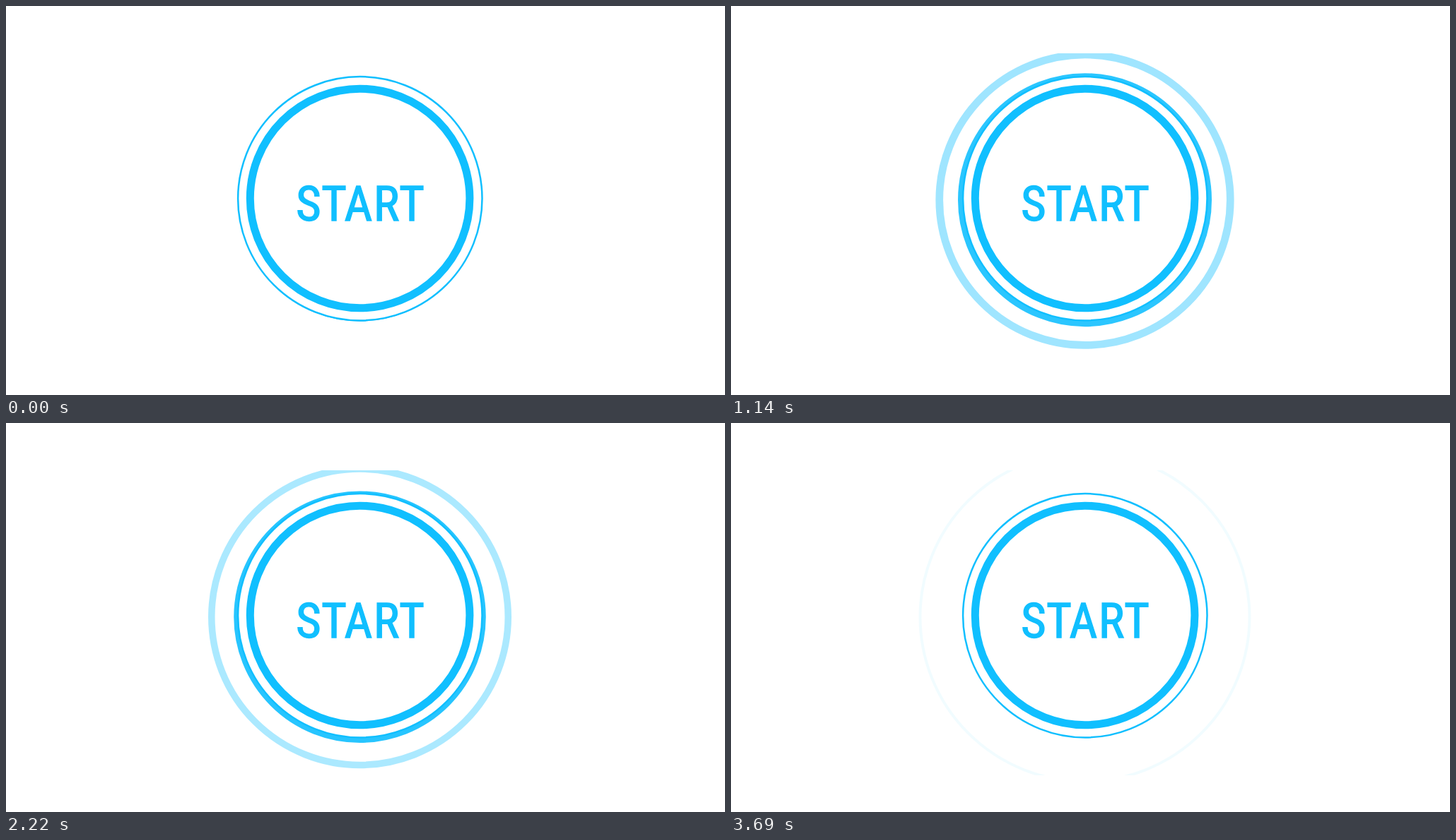
An HTML page for the animation above (4.32 s loop, 1017x551 px).

```html
<!DOCTYPE html>
<html lang="en">
<head>
<meta charset="utf-8">
<title>Start button</title>
<style>
  html, body { margin: 0; width: 100%; height: 100%; overflow: hidden; background: #fff; }
  svg { display: block; width: 100%; height: 100%; }
  text {
    font: 400 69px "Roboto Condensed", "Noto Sans Mono", monospace;
    text-anchor: middle;
    fill: #10bfff;
    stroke: #10bfff;
    stroke-width: 1.3;
  }
</style>
</head>
<body>
<svg viewBox="0 0 1017 551">
  <defs>
    <clipPath id="band"><rect x="0" y="67" width="1017" height="432"/></clipPath>
  </defs>
  <g id="waves" clip-path="url(#band)" fill="none" stroke="#10bfff">
    <circle id="trace" cx="500.5" cy="274.7" r="233" stroke-width="4" stroke-opacity=".055"/>
  </g>
  <g fill="#fff" stroke="#10bfff">
    <circle cx="500.8" cy="272.8" r="172.7" stroke-width="2.5"/>
    <circle cx="500.6" cy="272.5" r="155.3" stroke-width="11"/>
  </g>
  <text x="428 464 498.5 538 574" y="303.6">START</text>
</svg>
<script>
  const LOOP = 4320, STEP = 30, REST = 3690;
  const INNER = 172, OUTER = 234, WEIGHT = 15, THIN_FROM = .4;

  const pulses = [
    { start: 0, life: 1808 },
    { start: 908, life: 1914 },
    { start: 2062, life: 1562 }
  ];

  const waves = document.getElementById("waves");
  const trace = document.getElementById("trace");

  for (const pulse of pulses) {
    pulse.ring = waves.appendChild(trace.cloneNode());
    pulse.ring.removeAttribute("id");
  }

  // Grows steadily, fades steadily, and thins out after THIN_FROM
  function drawPulse({ start, life, ring }, t) {
    const p = (t - start) / life;
    const live = p >= 0 && p < 1;
    ring.style.display = live ? "" : "none";
    if (!live) return;
    const radius = INNER + (OUTER - INNER) * p;
    const left = Math.min(1, (1 - p) / (1 - THIN_FROM));
    const weight = WEIGHT * left ** .7;
    ring.setAttribute("r", radius - weight / 2);
    ring.setAttribute("stroke-width", weight);
    ring.setAttribute("stroke-opacity", 1 - .95 * p);
  }

  function draw(ms) {
    const t = Math.floor((ms % LOOP) / STEP) * STEP;
    for (const pulse of pulses) drawPulse(pulse, t);
    trace.style.display = t >= REST ? "" : "none";
  }

  const begin = performance.now();
  function tick() {
    draw(performance.now() - begin);
    requestAnimationFrame(tick);
  }
  tick();
</script>
</body>
</html>
```
